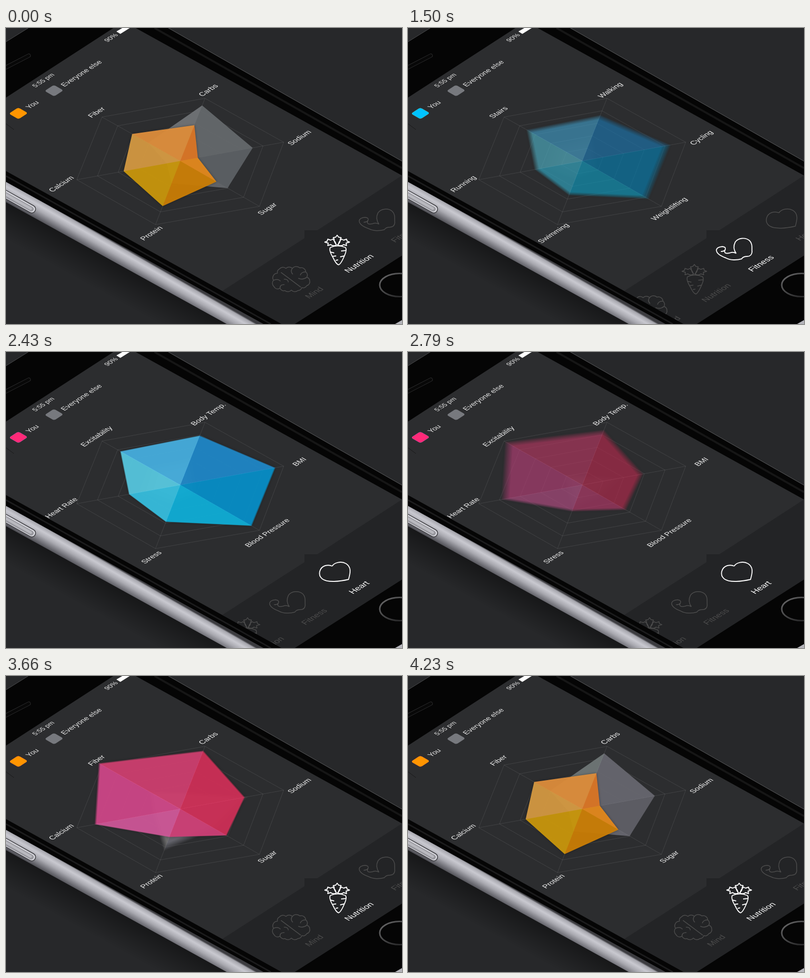
An HTML page with a canvas that plays this animation: 800x600 px, repeating every 4.26 s.

```html
<!DOCTYPE html>
<html lang="en">
<head>
<meta charset="utf-8">
<style>
html, body { margin: 0; width: 100%; height: 100%; overflow: hidden; background: #27282a; }
canvas { display: block; }
</style>
</head>
<body>
<canvas id="stage" width="800" height="600"></canvas>
<script>
const ctx = document.getElementById('stage').getContext('2d');
const layer = document.createElement('canvas');
layer.width = 800;
layer.height = 600;
const lctx = layer.getContext('2d');

const LOOP = 4260, GROW = 270, SHRINK = 300, SLIDE = 180, SHUTTER = 24, SAMPLES = 8;
const CENTER = [352, 269.5];
const AXES = [[50, -127], [209, -38], [160, 92], [-50, 129], [-209, 38], [-158, -89]];
const LABEL_SPOTS = [[413, 128.5], [597, 225], [532, 369], [298, 418.5], [116, 318.5], [187, 173.5]];
const GRAYS = ['#666a6d', '#5d6165', '#64686c', '#6c6e70', '#757678', '#717478'];

// Times: youIn / youOut / elseOut are the starts of each move.
const charts = [
  { color: '#ff9500', youIn: -360, elseOut: 870, youOut: 990,
    labels: ['Carbs', 'Sodium', 'Sugar', 'Protein', 'Calcium', 'Fiber'],
    you: [.57, .17, .457, .71, .547, .615], rest: [.885, .7, .597, .35, .13, .41],
    fills: ['#dc7626', '#e58a1c', '#cd7f06', '#cb980c', '#d69b42', '#e08f3c'] },
  { color: '#00c3ff', youIn: 1410, elseOut: 2160, youOut: 2280,
    labels: ['Walking', 'Cycling', 'Weightlifting', 'Swimming', 'Running', 'Stairs'],
    you: [.7, .815, .8, .515, .44, .68], rest: [.8, .26, .39, .57, .705, .75],
    fills: ['#1c85c8', '#0893cb', '#10aed8', '#35c3de', '#58c4e3', '#48aee3'] },
  { color: '#ff2a78', youIn: 2700, elseOut: 3430, youOut: 3570,
    labels: ['Body Temp.', 'BMI', 'Blood Pressure', 'Stress', 'Heart Rate', 'Excitability'],
    you: [.84, .564, .53, .4, .745, .94], rest: [.3, .74, .5, .74, .3, .45],
    fills: ['#d02f56', '#d13055', '#d13d76', '#d0579a', '#cf4a85', '#cd4070'] }
];

const tabs = [
  ['Mind', `M639 438A8 8 0 0 1 643 429A9 9 0 0 1 656 428A9 9 0 0 1 669 428A10 10 0 0 1 684 427
    A9 9 0 0 1 696 435A8 8 0 0 1 698 446A7 7 0 0 1 704 453A8 8 0 0 1 698 463A9 9 0 0 1 688 467
    A8 8 0 0 1 680 473A9 9 0 0 1 667 472A9 9 0 0 1 654 473A8 8 0 0 1 644 468A8 8 0 0 1 632 465
    A9 9 0 0 1 631 452A9 9 0 0 1 639 438M646 436L686 466M631 452Q640 448 645 454M644 468Q644 460 653 461
    M669 428Q664 434 670 440M696 435Q687 435 685 442M698 446Q690 452 681 448M652 450Q660 449 661 456`],
  ['Nutrition', `M655 445Q670 438 686 445Q689 450 684 461Q677 478 672 480Q667 479 661 466Q652 451 655 445
    M655 454L663 456M687 451L677 452M659 463L667 462M683 462L675 464M666 471L671 470
    M668 440Q662 433 663 428L661 425L666 424L669 420L672 424L677 425L675 429Q676 435 669 440
    M667 440Q660 443 656 439L650 441L651 436L644 434L649 432L650 428L656 430L660 428Q666 433 667 440
    M671 440Q678 443 682 439L688 441L687 436L694 434L689 432L688 428L682 430L678 428Q672 433 671 440`],
  ['Fitness', `M663 457Q655 446 661 434C667 425 682 424 690 431C697 438 694 447 695 454Q694 463 685 463
    Q677 463 674 468C664 471 651 471 642 466Q623 459 623 450Q624 444 635 443Q643 444 641 449Q639 453 632 453
    M641 449C637 456 642 458 650 456Q657 453 663 457`],
  ['Heart', `M659 434C663 427 677 423 687 429C698 436 696 447 692 461C675 465 650 468 639 460
    C629 452 633 437 645 433Q653 431 659 434`]
].map(([name, d]) => ({ name, icon: new Path2D(d) }));

const clamp = u => Math.max(0, Math.min(1, u));
const backOut = u => { const v = clamp(u) - 1; return 1 + 3 * v ** 3 + 2 * v * v; };

function poly(c, fill, ...p) {
  c.beginPath();
  for (let i = 0; i < p.length; i += 2) c.lineTo(p[i], p[i + 1]);
  c.closePath();
  c.fillStyle = fill;
  c.fill();
}

function line(color, width, ...p) {
  ctx.beginPath();
  for (let i = 0; i < p.length; i += 2) ctx.lineTo(p[i], p[i + 1]);
  ctx.strokeStyle = color;
  ctx.lineWidth = width;
  ctx.stroke();
}

function gradient(x0, y0, x1, y1, ...stops) {
  const g = ctx.createLinearGradient(x0, y0, x1, y1);
  stops.forEach(([at, color]) => g.addColorStop(at, color));
  return g;
}

// Runs draw() in the tilted plane of the phone screen.
function tilted(x, y, draw) {
  ctx.save();
  ctx.transform(.838, -.545, .869, .494, x, y);
  draw();
  ctx.restore();
}

function text(str, x, y, size, color, align = 'left') {
  tilted(x, y, () => {
    ctx.font = `${size}px "Liberation Sans", Arial, sans-serif`;
    ctx.textAlign = align;
    ctx.fillStyle = color;
    ctx.fillText(str, 0, 0);
  });
}

function swatch(x, y, color) {
  tilted(x, y, () => {
    ctx.beginPath();
    ctx.roundRect(-11.2, -11.2, 22.4, 22.4, 4);
    ctx.fillStyle = color;
    ctx.fill();
  });
}

function drawPhone() {
  ctx.fillStyle = '#27282a';
  ctx.fillRect(0, 0, 800, 600);
  poly(ctx, gradient(181, 456, 150, 512, [0, 'rgba(0,0,0,.4)'], [1, 'rgba(0,0,0,0)']),
    0, 350, 446, 600, 300, 600, 0, 434);
  poly(ctx, '#050505', 0, 28, 45, 0, 328, 0, 800, 270, 800, 600, 520, 600, 0, 312);
  line('#4a4b4d', 1, 0, 28, 45, 0);
  line('#5a5b5d', 1, 328, 0, 800, 270);
  line('#161616', 4, 300, 0, 800, 284);
  line('#1c1c1d', 3, 0, 300, 535, 600);

  poly(ctx, gradient(200, 423, 181, 456, [0, '#3c3c40'], [.08, '#a6a6ad'], [.3, '#c9c9d0'],
    [.55, '#a9a9b0'], [.8, '#77777e'], [1, '#505056']), 0, 312, 520, 600, 446, 600, 0, 353);
  ctx.lineCap = 'round';
  line('#3a3a3e', 17, -10, 332, 52, 367);
  line('#d2d2d8', 14, -10, 332, 52, 367);
  line('#97979d', 10, -10, 333, 51, 367);
  line('#b9b9bf', 5, -10, 332, 50, 366);

  line('#2b2b2c', 8, -10, 85, 46, 56);
  line('#080808', 6, -10, 85, 46, 56);
  ctx.lineCap = 'butt';

  poly(ctx, '#2c2d2f', 0, 141, 217, 0, 262, 0, 800, 299, 800, 461, 583, 600, 557, 600, 0, 290);
  line('#18191a', 1, 0, 194, 16, 206);
  poly(ctx, '#232426', 437, 533, 603, 426, 603, 410, 629, 410, 800, 299, 800, 461, 583, 600, 557, 600);
  poly(ctx, '#b5b5bb', 786, 600, 800, 592, 800, 600);

  ctx.beginPath();
  ctx.ellipse(795, 521, 40, 23.5, 0, 0, 7);
  ctx.strokeStyle = gradient(755, 500, 790, 545, [0, '#6a6a6b'], [1, '#2c2c2d']);
  ctx.lineWidth = 3;
  ctx.stroke();

  text('5:55 pm', 59.5, 121, 13, '#e6e6e6');
  text('90%', 205, 29, 13.2, '#e6e6e6');
  poly(ctx, '#fff', 223, 7, 231, 12, 250, 0, 235, 0);
  swatch(97, 127, '#77797e');
  text('Everyone else', 118, 119.5, 14.5, '#e6e6e6');
  text('You', 47, 164.5, 14.4, '#e6e6e6');
}

function drawGrid() {
  const [cx, cy] = CENTER;
  ctx.beginPath();
  for (let r = .2; r < 1.1; r += .2) {
    AXES.forEach(([x, y], i) => ctx[i ? 'lineTo' : 'moveTo'](cx + x * r, cy + y * r));
    ctx.closePath();
  }
  AXES.forEach(([x, y]) => { ctx.moveTo(cx, cy); ctx.lineTo(cx + x, cy + y); });
  ctx.strokeStyle = 'rgba(255,255,255,.1)';
  ctx.lineWidth = 1;
  ctx.stroke();
}

function facets(values, fills, scale) {
  const [cx, cy] = CENTER;
  const at = i => [cx + AXES[i][0] * values[i] * scale, cy + AXES[i][1] * values[i] * scale];
  fills.forEach((fill, i) => poly(lctx, fill, cx, cy, ...at(i), ...at((i + 1) % 6)));
}

// Averages several moments around t, which gives the motion blur.
function drawShape(values, fills, t, start, end, opacity, shadow) {
  if (t < start - SHUTTER || t > end + SHRINK + SHUTTER) return;
  const size = s => s < end ? backOut((s - start) / GROW) : backOut(1 - (s - end) / SHRINK);
  const moving = t < start + GROW + SHUTTER || t > end - SHUTTER;
  const count = moving ? SAMPLES : 1;
  lctx.globalCompositeOperation = 'source-over';
  lctx.clearRect(0, 0, 800, 600);
  lctx.globalCompositeOperation = 'lighter';
  lctx.globalAlpha = 1 / count;
  for (let k = 0; k < count; k++) {
    const scale = size(t + ((k + .5) / count - .5) * SHUTTER);
    if (scale > .002) facets(values, fills, scale);
  }
  ctx.save();
  ctx.globalAlpha = opacity * clamp((t - start) / 150);
  if (shadow) {
    ctx.shadowColor = 'rgba(0,0,0,.35)';
    ctx.shadowBlur = 5;
  }
  ctx.drawImage(layer, 0, 0);
  ctx.restore();
}

function drawTabs(pos) {
  ctx.save();
  ctx.beginPath();
  [[437, 533], [800, 299], [800, 461], [583, 600], [557, 600]].forEach(p => ctx.lineTo(...p));
  ctx.clip();
  ctx.lineJoin = 'round';
  tabs.forEach(({ name, icon }, i) => {
    const k = i - pos, active = clamp(1 - Math.abs(k));
    const v = 76 + 179 * active, color = `rgb(${v},${v},${v})`;
    ctx.save();
    ctx.translate(k * 90.5, k * -59.3);
    ctx.strokeStyle = color;
    ctx.lineWidth = 1.5 + .4 * active;
    ctx.stroke(icon);
    text(name, 718, 480, 16.6, color, 'center');
    ctx.restore();
  });
  ctx.restore();
}

function render(t) {
  const starts = [870, 2160, 3450];
  const passed = starts.filter(s => t >= s).length;
  const to = passed % 3, from = passed ? passed - 1 : 0;
  const mix = passed ? 1 - (1 - clamp((t - starts[passed - 1]) / SLIDE)) ** 3 : 1;

  drawPhone();
  drawGrid();
  [[from, 1 - mix], [to, mix]].forEach(([i, alpha]) => {
    ctx.globalAlpha = alpha;
    charts[i].labels.forEach((label, n) => text(label, ...LABEL_SPOTS[n], 14.7, '#f0f0f0', 'center'));
  });
  ctx.globalAlpha = 1;
  swatch(25, 173, charts[from].color);
  ctx.globalAlpha = mix;
  swatch(25, 173, charts[to].color);
  ctx.globalAlpha = 1;

  charts.forEach((c, i) => {
    const time = i === 0 && t > 3800 ? t - LOOP : t;
    drawShape(c.rest, GRAYS, time, c.youIn + 65, c.elseOut, .93, false);
    drawShape(c.you, c.fills, time, c.youIn, c.youOut, .94, true);
  });
  drawTabs(1 + from + (to - from) * mix);
}

function tick() {
  render(performance.now() % LOOP);
  requestAnimationFrame(tick);
}
tick();
</script>
</body>
</html>
```
